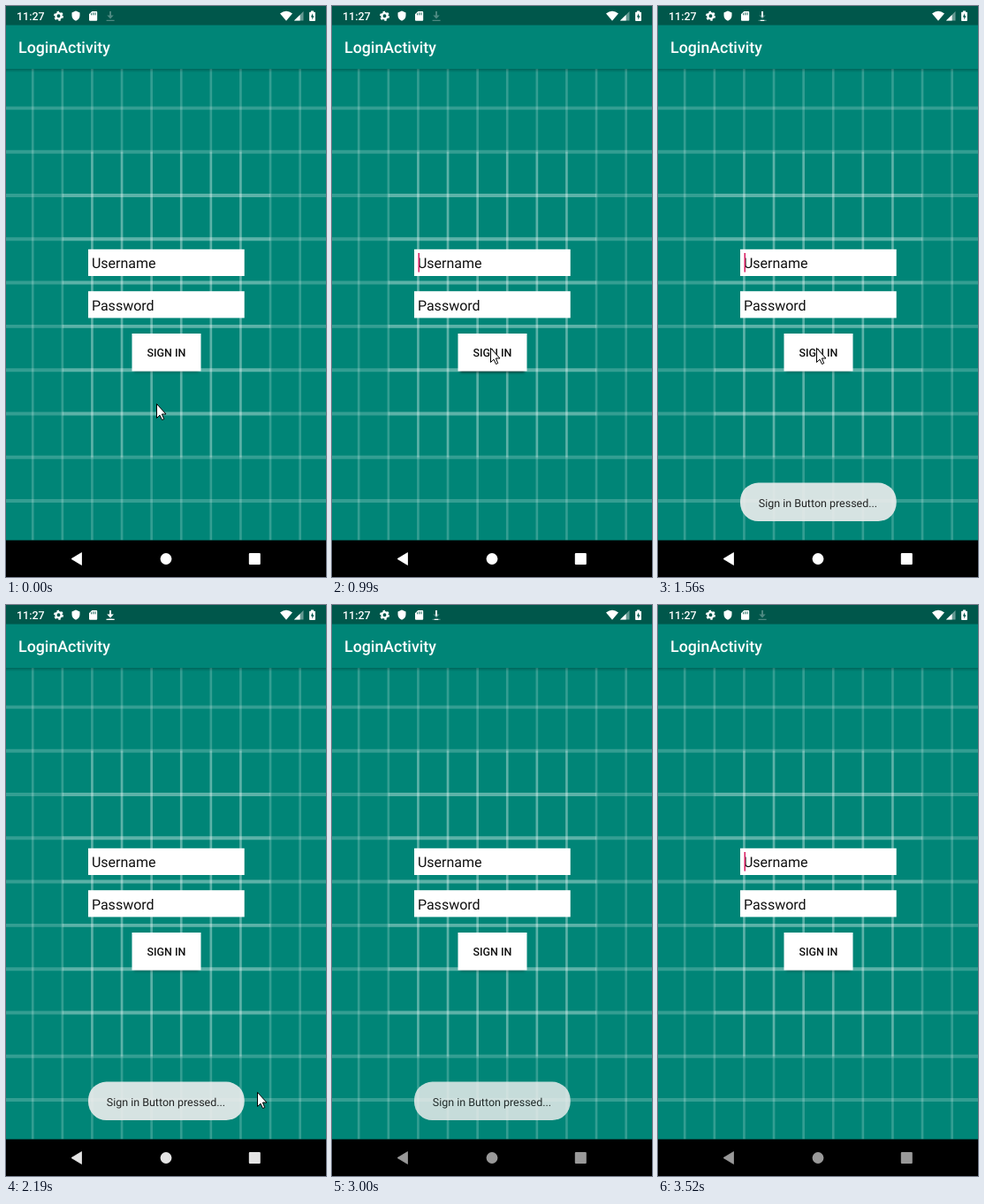
These frames come from a looping animation (362x645 px, 3620 ms). An HTML page:

```html
<!DOCTYPE html>
<html lang="en">
<head>
<meta charset="utf-8">
<title>Login screen</title>
<style>
  html, body { margin: 0; width: 100%; height: 100%; overflow: hidden; background: #000; }
  svg { display: block; width: 362px; height: 645px; }
  text { font-family: Roboto, "Noto Sans", sans-serif; text-rendering: geometricPrecision; }
  .medium { font-weight: 500; }
</style>
</head>
<body>
<svg viewBox="0 0 362 645">
  <defs>
    <linearGradient id="fall" x2="0" y2="1">
      <stop offset="0" stop-opacity=".24"/>
      <stop offset="1" stop-opacity="0"/>
    </linearGradient>
    <filter id="soft" x="-20%" y="-30%" width="140%" height="170%">
      <feGaussianBlur stdDeviation="1.4"/>
    </filter>
  </defs>

  <rect width="362" height="645" fill="#008577"/>
  <g id="grid" transform="translate(0 71) scale(3.36 4.93)" fill="none" stroke="#fff" stroke-opacity=".2" stroke-width=".8"/>
  <rect width="362" height="71" fill="#008577"/>
  <rect y="71" width="362" height="4" fill="url(#fall)"/>
  <rect width="362" height="21.6" fill="#00574b"/>
  <text class="medium" x="14" y="53.3" font-size="17.8" fill="#fff">LoginActivity</text>

  <!-- status bar -->
  <g fill="#fff">
    <text class="medium" x="12" y="16" font-size="12.47">11:27</text>
    <circle cx="59.5" cy="11.3" r="3.1" fill="none" stroke="#fff" stroke-width="2.3"/>
    <circle cx="59.5" cy="11.3" r="4.7" fill="none" stroke="#fff" stroke-width="1.6" stroke-dasharray="2.46"/>
    <path d="M79 5.6l4.5 2v3.2c0 2.8-1.8 5-4.5 6c-2.7-1-4.500-3.200-4.500-6v-3.200z"/>
    <path d="M97.3 6h4.9q1 0 1 1v8.700q0 1-1 1h-7.200q-1 0-1-1v-6.400z"/>
    <path d="M96.6 8.2v2.1M98.8 7.4v2.9M101 7.4v2.9" stroke="#00574b" stroke-width=".9"/>
    <path opacity=".3" d="M117.100 6h1.900v4.500h2.800l-3.750 4l-3.750-4h2.800zM113.600 15.700h9v1.400h-9z"/>
    <path id="stub" d="M117.100 6h1.900v6.500h-1.900zM115.800 15.700h4.500v1.400h-4.500z"/>
    <path id="arrow" d="M114.300 10.500h7.500l-3.750 4zM113.600 15.700h9v1.400h-9z"/>
    <path d="M310 8.400q7-5.200 14 0l-7 8.400z"/>
    <path d="M336.500 6v10.600h-10.600z" opacity=".4"/>
    <path d="M332.600 10v6.600h-6.700z"/>
    <path d="M345 5.600h3v1.200h1.100q.8 0 .8.800v8.600q0 .8-.8.800h-5.200q-.8 0-.8-.8v-8.600q0-.8.800-.8h1.100z"/>
    <path d="M347 8.300l-2.200 4.200h1.500v2.900l2.200-4.200h-1.500z" fill="#00574b"/>
  </g>

  <!-- form -->
  <g fill="#fff">
    <rect x="93" y="274.8" width="176.7" height="30.2"/>
    <rect x="93" y="322.2" width="176.7" height="30.2"/>
  </g>
  <g font-size="16.03" fill="#111">
    <text x="96.9" y="296.2">Username</text>
    <text x="96.9" y="343.8">Password</text>
  </g>
  <rect id="caret" x="97.5" y="279" width="1.5" height="21.6" fill="#d81b60"/>
  <rect id="shade" x="145" y="374" width="73" height="40" filter="url(#soft)"/>
  <rect x="142.5" y="370" width="78" height="42.5" fill="#fff"/>
  <text class="medium" x="159.4" y="396.1" font-size="12.47" fill="#111">SIGN IN</text>

  <g id="toast">
    <rect x="93" y="538.6" width="176.7" height="43.4" rx="20.5" fill="#eee" fill-opacity=".9"/>
    <text x="113.8" y="565.5" font-size="12.47" fill-opacity=".84">Sign in Button pressed...</text>
  </g>

  <!-- navigation bar -->
  <rect y="603.5" width="362" height="42"/>
  <g id="nav" fill="#fff">
    <path d="M74 624.5l11.5-6.9v13.8z" stroke="#fff" stroke-width=".8" stroke-linejoin="round"/>
    <circle cx="181" cy="624.5" r="6.4"/>
    <rect x="274.8" y="618" width="13" height="13" rx="1"/>
  </g>
  <path id="mouse" d="M.5.5V16.500L4 13.200L6.500 18.500L8.700 17.600L6.400 12H11z" fill="#fff" stroke="#000"/>
</svg>

<script>
const LOOP = 3620, STEP = 130;
const $ = id => document.getElementById(id);
const fade = (id, value) => $(id).setAttribute('opacity', value);
const ramp = (t, from, to) => Math.min(1, Math.max(0, (t - from) / (to - from)));

function addLine(d) {
  const p = document.createElementNS('http://www.w3.org/2000/svg', 'path');
  p.setAttribute('d', d);
  $('grid').append(p);
}
for (let i = 9; i < 100; i += 10) {
  addLine(`M${i} 0V108`);
  addLine(`M0 ${i}H108`);
}
for (let i = 29; i < 80; i += 10) {
  addLine(`M19 ${i}H89`);
  addLine(`M${i} 19V89`);
}

// Glide to the button, wait, then jump away and leave past the bottom edge
function mouseAt(t) {
  if (t < 2200) {
    const p = 1 - (1 - ramp(t, 0, 600)) ** 3;
    return [170 + 9 * p, 449 - 63 * p];
  }
  const p = ramp(t, 2200, 2600);
  return [283 + 33 * p, 548 + 85 * p];
}

function draw(now) {
  // The screen refreshes in steps, the first one cut short
  const t = STEP * Math.floor((now % LOOP + 50) / STEP);
  const [x, y] = mouseAt(t).map(Math.round);
  $('mouse').setAttribute('transform', `translate(${x} ${y})`);
  fade('mouse', t < 2700 ? 1 : 0);

  const phase = (t + 200) % 1220;
  fade('stub', phase > 400 ? 1 : 0);
  fade('arrow', phase > 1000 ? 1 : 0);

  fade('caret', Math.floor((t - 71) / 486) % 2 === 1 ? 1 : 0);
  fade('shade', .25 + .35 * Math.max(0, 1 - Math.abs(t - 1040) / 250));
  fade('toast', ramp(t, 1060, 1450) - ramp(t, 2960, 3380));
  fade('nav', 1 - .4 * ramp(t, 1500, 2900) ** 2);
}

let start;
function frame(now) {
  start ??= now;
  draw(now - start);
  requestAnimationFrame(frame);
}
draw(0);
requestAnimationFrame(frame);
</script>
</body>
</html>
```
